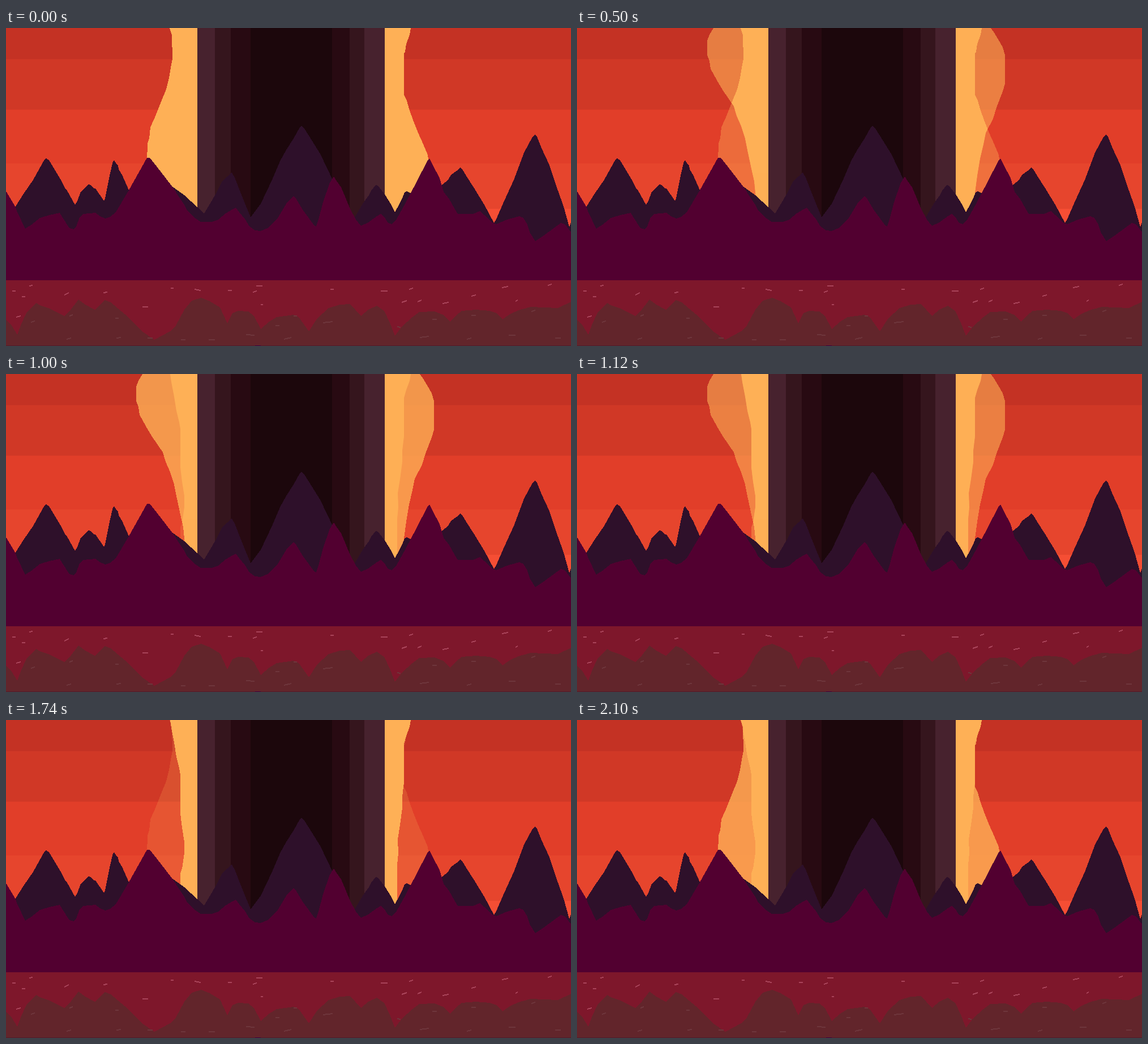
Animation, 998 px wide and 561 px high, one loop 2220 ms. Source, as an HTML page:

```html
<!DOCTYPE html>
<html lang="en">
<head>
<meta charset="utf-8">
<title>Burning tower</title>
<style>
html, body { margin: 0; width: 100%; height: 100%; overflow: hidden; background: #520030; }
svg { display: block; width: 100%; height: 100%; shape-rendering: crispEdges; }

/* three flame outlines fade into each other in fifths, 120 ms apart */
.fire use { fill: #feb056; animation: 2220ms step-end infinite; }
.fire .a { animation-name: fadeA; }
.fire .b { animation-name: fadeB; }
.fire .c { animation-name: fadeC; }
.fire .ab { animation-name: showAB; }
.fire .bc { animation-name: showBC; }
.fire .ca { animation-name: showCA; }

@keyframes fadeA {
  0% { opacity: 1; }
  11.7117% { opacity: 1; animation-timing-function: steps(5, start); }
  38.7387% { opacity: 0; }
  78.3783% { opacity: 0; animation-timing-function: steps(4, start); }
  100% { opacity: .8; }
}
@keyframes fadeB {
  0% { opacity: 0; }
  11.7117% { opacity: 0; animation-timing-function: steps(5, start); }
  38.7387% { opacity: 1; }
  45.045% { opacity: 1; animation-timing-function: steps(5, start); }
  72.072%, 100% { opacity: 0; }
}
@keyframes fadeC {
  0% { opacity: 0; }
  45.045% { opacity: 0; animation-timing-function: steps(5, start); }
  72.072% { opacity: 1; }
  78.3783% { opacity: 1; animation-timing-function: steps(4, start); }
  100% { opacity: .2; }
}
@keyframes showAB { 0% { opacity: 1; } 45.045%, 100% { opacity: 0; } }
@keyframes showBC { 0% { opacity: 0; } 45.045% { opacity: 1; } 78.3783%, 100% { opacity: 0; } }
@keyframes showCA { 0% { opacity: 0; } 78.3783%, 100% { opacity: 1; } }
</style>
</head>
<body>
<svg viewBox="0 0 998 561" preserveAspectRatio="none">
  <defs>
    <path id="a" d="M289 0L293 12 294 55 291 70 288 88 283 108 272 135 262 160 255 175 253 195 250 203 249 235V340H747V240L745 224 737 205 728 185 720 165 712 143 708 128 703 118V45L705 42 707 28 713 12 715 0Z"/>
    <path id="b" d="M241 0L234 12 230 22V48L234 58 236 72 247 92 257 109 268 125 277 138 282 155 290 173 297 195 302 220 308 248 313 270 316 300 318 340H702L703 290 707 260 712 230 718 205 722 185 735 160 741 140 752 112 756 98V48L752 34 744 20 738 10 731 0Z"/>
    <path id="c" d="M290 0L292 14 297 40 301 65 306 85 308 97V165L311 190 315 215V235L311 262 308 270V340H691V255L693 235 692 210 696 185 700 155V135L703 110V42L707 28 713 12 715 0Z"/>
    <clipPath id="inA"><use href="#a"/></clipPath>
    <clipPath id="inB"><use href="#b"/></clipPath>
    <clipPath id="inC"><use href="#c"/></clipPath>
  </defs>

  <!-- sky -->
  <rect width="998" height="55" fill="#c43224"/>
  <rect y="55" width="998" height="89" fill="#d03826"/>
  <rect y="144" width="998" height="95" fill="#e13e29"/>
  <rect y="239" width="998" height="80" fill="#e6452d"/>
  <rect y="319" width="998" height="80" fill="#f54e34"/>

  <!-- overlaps stay solid under the fading outlines -->
  <g class="fire">
    <use class="ab" href="#a" clip-path="url(#inB)"/>
    <use class="bc" href="#b" clip-path="url(#inC)"/>
    <use class="ca" href="#c" clip-path="url(#inA)"/>
    <use class="a" href="#a"/>
    <use class="b" href="#b"/>
    <use class="c" href="#c"/>
  </g>

  <!-- tower -->
  <rect x="338" width="331" height="400" fill="#47222e"/>
  <rect x="369" width="264" height="400" fill="#35151d"/>
  <rect x="397" width="210" height="400" fill="#280a12"/>
  <rect x="432" width="144" height="400" fill="#1c070c"/>

  <!-- far mountains -->
  <g fill="#2e102a">
    <path d="M0 400V316H16L32 291 48 268 59 248 68 232 71 230 76 233 82 243 94 263 97 268 105 284 108 287 122 312 126 305 132 289 143 278 146 276 150 277 155 283 158 283 173 305 175 301 181 271 184 256 189 235 191 233 194 238 198 243 199 249 205 259 217 286 250 300V400Z"/>
    <path d="M250 400V240L290 277 315 295 338 316 350 327 361 309 372 290 382 270 399 255 404 264 415 292 432 334 450 310 470 268 484 235 495 215 508 195 519 175 522 173 526 176 535 190 555 222 578 270 600 318 616 334 630 310 641 295 645 287 653 277 657 278 664 287 670 295 680 311 687 325V400Z"/>
    <path d="M687 400V325L694 312 700 300 704 290 708 288 714 291 740 290 771 276 781 268 786 259 796 252 802 246 806 249 815 264 826 281 845 312 862 344 866 337 880 305 897 268 915 220 930 192 934 188 938 192 946 212 960 242 970 273 985 315 995 351 998 343V400Z"/>
  </g>

  <!-- near mountains -->
  <g fill="#520030">
    <path d="M0 445V288L17 316 20 325 34 354 45 347 60 335 77 330 95 326 101 336 112 353 120 355 124 350 130 334 136 328 158 326 166 332 175 336 184 333 194 325 217 286 235 254 249 229 254 229 262 239 280 262 296 283 305 297 315 312 320 322 335 336 344 342 363 342V445Z"/>
    <path d="M363 445V342L375 338 388 327 400 320 406 317 412 325 422 337 430 350 440 357 450 358 462 353 480 335 497 307 508 297 513 302 525 322 545 349 548 350 552 338 560 307 572 273 579 262 584 270 592 281 600 300 607 317 618 338 627 349 640 343 655 332 662 328 668 333 675 344 682 346V445Z"/>
    <path d="M682 445V346L690 337 706 308 725 272 745 233 748 230 753 240 766 265 773 289 783 302 792 318 798 328H825L837 323 845 330 857 342 866 346 885 338 907 332 914 335 920 345 926 362 935 376 950 366 980 344 987 346 998 360V445Z"/>
  </g>

  <!-- ground -->
  <rect y="445" width="998" height="116" fill="#7e172b"/>
  <path fill="#62252b" d="M0 561V514L10 525 20 541 27 522 36 503 53 485 62 490 75 494 103 508 112 500 128 479 140 488 157 497 175 480 185 484 210 505 240 535 262 550 290 535 300 525 315 497 328 481 345 476 360 482 378 493 391 521 400 503 410 499 428 500 438 508 450 531 465 518 478 510 508 506 517 510 535 535 550 512 570 494 590 488 607 487 617 497 627 508 640 497 655 490 668 499 678 520 687 543 700 526 718 510 730 501 757 500 772 506 785 518 795 507 805 499 830 497 855 499 866 503 877 514 890 505 905 498 927 492 950 493 975 494 998 483V561Z"/>
  <path fill="none" stroke="#a9445a" stroke-width="2" d="M11 464h6M28 474h6M41 455l6 -1M18 510l8 -2M103 471l8 -4M172 467l7 -1M241 492h10M291 459h5M333 461l11 2M392 463h7M436 466l7 -2M442 455h11M450 488h4M573 461h6M662 464h12M699 484l9 -3M712 461l7 -2M727 483l7 -3M771 486l11 -2M822 473l8 -2M876 458l11 -2M900 482l4 -2M957 454l7 -2"/>
  <path fill="none" stroke="#6e363c" stroke-width="2" d="M44 519l7 -2M112 508l6 -2M107 549l8 -2M193 512h6M195 547l8 -1M250 547h9M309 550h8M358 550h11M424 541l15 1M476 525h7M491 549l13 -3M508 508h6M560 520l17 -2M691 527l6 1M731 546l16 -2M753 514h8M814 549l8 -2M822 507h8M888 542h12M928 500l7 -2M970 547h10"/>
  <rect y="560" width="998" height="1" fill="#4f1c2b"/>
  <rect x="440" y="560" width="10" height="1" fill="#3a0040"/>
</svg>
</body>
</html>
```
